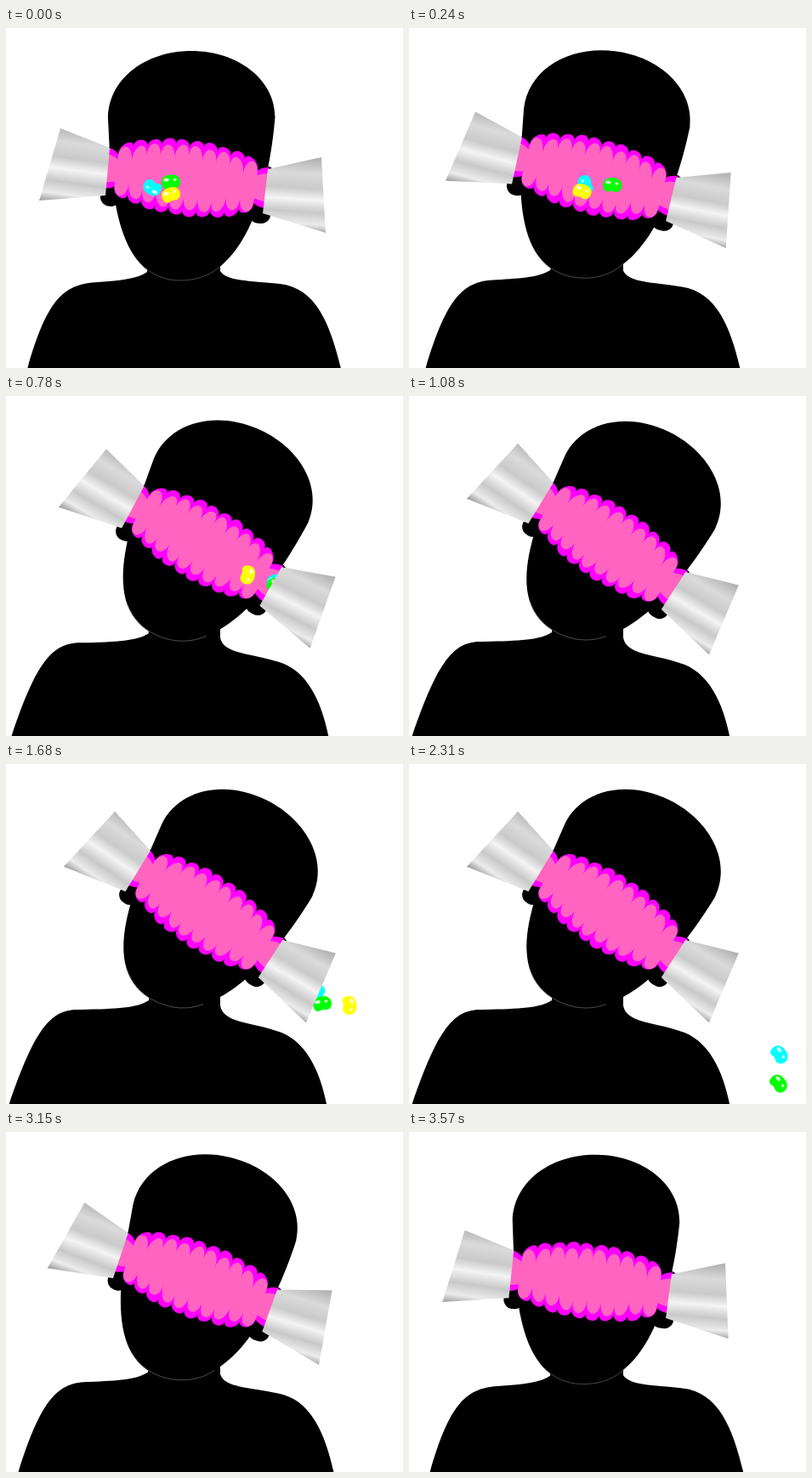
Animation, 467 px wide and 400 px high, one loop 3.6 s. Source, as an HTML page:

```html
<!DOCTYPE html>
<html lang="en">
<head>
<meta charset="utf-8">
<title>Candy head</title>
<style>
  html, body { margin: 0; width: 100%; height: 100%; overflow: hidden; background: #fff; }
  svg { display: block; width: 467px; height: 400px; }
</style>
</head>
<body>
<svg viewBox="0 0 467 400" xmlns="http://www.w3.org/2000/svg">
  <defs>
    <linearGradient id="foilLeft" gradientUnits="userSpaceOnUse" x1="61" y1="115" x2="49" y2="204">
      <stop offset="0" stop-color="#b4b4b4"/>
      <stop offset=".2" stop-color="#dadada"/>
      <stop offset=".4" stop-color="#cacaca"/>
      <stop offset=".55" stop-color="#f4f4f4"/>
      <stop offset=".72" stop-color="#c8c8c8"/>
      <stop offset=".88" stop-color="#ececec"/>
      <stop offset="1" stop-color="#9c9c9c"/>
    </linearGradient>
    <linearGradient id="foilRight" href="#foilLeft" x1="342" y1="153" x2="336" y2="240"/>
    <g id="bean">
      <path d="M-11 0C-11 -6 -6 -8.5 0 -8.5C7 -8.5 11 -5 11 0C11 5 8 8 4 8C2 8 1 7 -1 7C-3 7 -4 8 -6 8C-9 8 -11 5 -11 0Z"/>
      <ellipse cx="-5" cy="-3" rx="3.4" ry="2" fill="#fff" opacity=".8"/>
      <ellipse cx="5" cy="-2" rx="2" ry="1.6" fill="#fff" opacity=".8"/>
    </g>
  </defs>

  <path id="body"/>

  <g class="tilt">
    <path d="M218 27C272 27 316.5 60 316.5 105C312 160 292 297 205 297C125 297 124 180 120 107C120 60 164 27 218 27Z"/>
    <path d="M258 275C244 290 226 297 205 297C186 297 171 290 158 277" fill="none" stroke="#777" stroke-width=".6"/>
    <rect x="114" y="138" width="24" height="72" rx="11" transform="rotate(7 126 174)"/>
    <rect x="288" y="162" width="26" height="68" rx="11" transform="rotate(7 301 196)"/>
    <g transform="translate(120 165) rotate(7)">
      <path id="wrapper" fill="#f0f"/>
      <path id="filling" fill="#ff64c1"/>
    </g>
  </g>

  <g id="beans"></g>

  <g class="tilt">
    <path d="M64 118L122 141L117 197L39 203Z" fill="url(#foilLeft)"/>
    <path d="M308 166L371 152L376 241L302 218Z" fill="url(#foilRight)"/>
  </g>
</svg>

<script>
const LOOP = 3600, STEP = 30, SWING = 900, MAX_TILT = 26.4;
const INSIDE_END = 1080, FALL_START = 1440, FALL_END = 2700;
const PIVOT = '229 223.5';
const CANDY_LENGTH = 187, RUFFLES = 10;
const $ = id => document.getElementById(id);
const mix = (a, b, k) => a + (b - a) * k;

// Each point is its upright place plus its shift at full tilt
function torso(k) {
  const p = (x, y, dx, dy) => `${x + dx * k} ${y + dy * k} `;
  return 'M' + p(24, 405, -22, 0) +
    'C' + p(48, 318, -14, -8) + p(68, 301, -15, -14) + p(108, 299, -20, -10) +
    'C' + p(135, 297, -5, -9) + p(155, 295, 0, -8) + p(166, 287, 2, -9) +
    'V250H252' +
    'L' + p(252, 286, 0, -2) +
    'C' + p(260, 298, -5, 6) + p(285, 297, 0, 6) + p(322, 301, -4, 13) +
    'C' + p(366, 306, -12, 18) + p(382, 350, -11, 15) + p(395, 405, -17, 0) + 'Z';
}

// Valleys between ruffles along one edge; side is -1 for top, 1 for bottom
function valleys(side, depth) {
  return Array.from({ length: RUFFLES + 1 }, (_, i) => {
    const x = mix(10, CANDY_LENGTH - 12, i / RUFFLES);
    const bulge = 3 + 33 * Math.sin(Math.PI * x / CANDY_LENGTH) ** 0.4;
    const wobble = Math.sin(i * 2.4 + side);
    const isEnd = i % RUFFLES === 0;
    const inset = isEnd ? depth * 0.4 : depth * (1 + 0.25 * wobble);
    return [x, side * (bulge + 1.5 * wobble - inset)];
  });
}

function ruffle(points, height) {
  return points.slice(1).map(([x, y], i) => {
    const [px, py] = points[i];
    const out = Math.sign(x - px);
    return `C${px - out} ${py + height} ${x + out} ${y + height} ${x} ${y}`;
  }).join('');
}

function candy(depth, height) {
  const top = valleys(-1, depth), bottom = valleys(1, depth).reverse();
  const end = 24 - depth * 0.5, right = CANDY_LENGTH + 1;
  return `M-3 ${-end}Q4 ${-end} ${top[0]}` + ruffle(top, -height) +
    `Q${right - 7} ${-end} ${right} ${-end}V${end}Q${right - 7} ${end} ${bottom[0]}` +
    ruffle(bottom, height) + `Q4 ${end} -3 ${end}Z`;
}

$('wrapper').setAttribute('d', candy(0, 12));
$('filling').setAttribute('d', candy(15, 23));

// "roll" runs in the head's frame, "fall" starts from a place seen at 1680 ms
const beans = [
  { color: '#0ff',
    roll: { from: [172, 188, 210], to: [309, 184, 332], power: 1.27 },
    fall: { at: [366, 270, -70], speed: [.111, .114, .198] } },
  { color: '#0f0',
    roll: { from: [194, 181, -8], to: [311, 189, 6], power: .9 },
    fall: { at: [372, 282, -12], speed: [.1, .149, .1] } },
  { color: '#ff0',
    roll: { from: [194, 196, -20], to: [275, 190, 80], power: 2.2 },
    fall: { at: [404, 284, 88], speed: [.163, .125, .1] } }
];

for (const bean of beans) {
  $('beans').insertAdjacentHTML('beforeend', `<use href="#bean" fill="${bean.color}"/>`);
  bean.node = $('beans').lastElementChild;
}

function rolling({ from, to, power }, t) {
  const u = t / 780, k = u ** power;
  const x = Math.min(335, mix(from[0], to[0], k));
  return [x, mix(from[1], to[1], k), mix(from[2], to[2], u)];
}

const falling = ({ at, speed }, t) => at.map((v, i) => v + speed[i] * (t - 1680));

function draw(time) {
  const t = Math.floor((time % LOOP) / STEP) * STEP;
  const k = Math.min(1, t / SWING, (LOOP - t) / SWING);
  const tilt = `rotate(${MAX_TILT * k} ${PIVOT})`;
  document.querySelectorAll('.tilt').forEach(g => g.setAttribute('transform', tilt));
  $('body').setAttribute('d', torso(k));

  const inside = t <= INSIDE_END;
  const visible = inside || (t >= FALL_START && t < FALL_END);
  $('beans').setAttribute('transform', inside ? tilt : '');
  $('beans').setAttribute('visibility', visible ? 'visible' : 'hidden');
  for (const { node, roll, fall } of beans) {
    const [x, y, turn] = inside ? rolling(roll, t) : falling(fall, t);
    node.setAttribute('transform', `translate(${x} ${y}) rotate(${turn})`);
  }
}

const start = performance.now();
function tick() {
  draw(performance.now() - start);
  requestAnimationFrame(tick);
}
tick();
</script>
</body>
</html>
```
